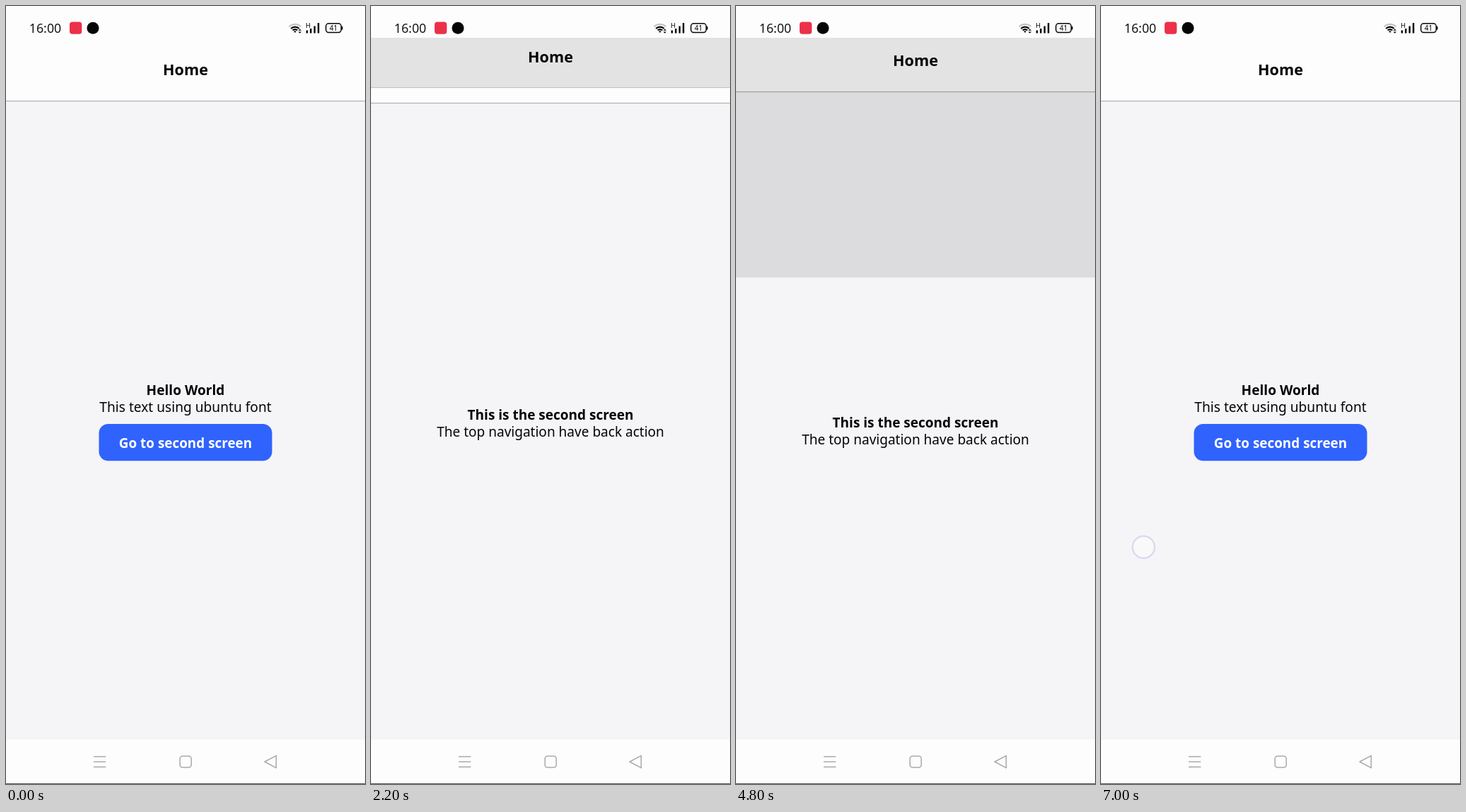
Animation, 508 px wide and 1102 px high, one loop 7040 ms. Source, as an HTML page with a canvas:

```html
<!DOCTYPE html>
<html lang="en">
<head>
<meta charset="utf-8">
<title>Screen navigation</title>
<style>
  html, body { margin: 0; width: 100%; height: 100%; overflow: hidden; background: #fefdfe; }
  canvas { display: block; width: 508px; height: 1102px; }
</style>
</head>
<body>
<canvas id="stage"></canvas>
<script>
const W = 508, H = 1102, LOOP = 7040;
const TOP = 45, BOTTOM = 1039, VIEW = BOTTOM - TOP;
const WHITE = '#fefdfe', PAPER = '#f5f4f7', INK = '#050505', GREY = '#a9a8aa';
const FONT = '"Noto Sans", "Open Sans", sans-serif';

const canvas = document.getElementById('stage');
const dpr = window.devicePixelRatio || 1;
canvas.width = W * dpr;
canvas.height = H * dpr;
const ctx = canvas.getContext('2d');

const clamp = v => Math.max(0, Math.min(1, v));

// Solves a CSS-style cubic bezier by bisection.
function bezier(x1, y1, x2, y2) {
  const at = (a, b, t) => 3 * (1 - t) * (1 - t) * t * a + 3 * (1 - t) * t * t * b + t * t * t;
  return x => {
    if (x <= 0 || x >= 1) return clamp(x);
    let lo = 0, hi = 1;
    for (let i = 0; i < 30; i++) {
      const mid = (lo + hi) / 2;
      if (at(x1, x2, mid) < x) lo = mid; else hi = mid;
    }
    return at(y1, y2, lo);
  };
}
const reveal = bezier(0.20833, 0.82, 0.25, 1);
const inOutQuad = u => u < 0.5 ? 2 * u * u : 1 - 2 * (1 - u) * (1 - u);

const REVEAL_MS = 425, OPEN = 2003, CLOSE = 4763;
const FADE = 240;
const TAPS = [
  { at: 1720, hold: 40, x: 297, y: 620.5 },
  { at: 3560, hold: 80, x: 41.5, y: 111.5 },
  { at: 4440, hold: 40, x: 38, y: 92 },
  { at: 6040, hold: 40, x: 61, y: 767 },
  { at: 6880, hold: 0, x: 60.3, y: 766.5 }
];

function rect(x, y, w, h, color) {
  ctx.fillStyle = color;
  ctx.fillRect(x, y, w, h);
}

function roundRect(x, y, w, h, r) {
  ctx.beginPath();
  ctx.roundRect(x, y, w, h, r);
}

function line(color, width, ...points) {
  ctx.beginPath();
  points.forEach(([x, y]) => ctx.lineTo(x, y));
  ctx.strokeStyle = color;
  ctx.lineWidth = width;
  ctx.stroke();
}

function text(str, x, y, size, weight = 400, color = INK) {
  ctx.font = `${weight} ${size}px ${FONT}`;
  ctx.textAlign = 'center';
  ctx.fillStyle = color;
  ctx.fillText(str, x, y);
}

function page(title) {
  rect(0, 0, W, H, PAPER);
  rect(0, 0, W, 134, WHITE);
  rect(0, 134, W, 1.3, '#b4b3b6');
  text(title, W / 2, 98, 21.6, 700);
}

function home(t) {
  page('Home');
  text('Hello World', W / 2, 550.5, 19.1, 700);
  text('This text using ubuntu font', W / 2, 574.5, 19.15);

  const pressed = t >= 1720 && t < 2010;
  ctx.save();
  ctx.globalAlpha = pressed ? 0.2 + 0.8 * inOutQuad(clamp((t - 1760) / 250)) : 1;
  roundRect(131.5, 592, 245, 52.3, 13);
  ctx.fillStyle = '#3063fd';
  ctx.fill();
  text('Go to second screen', W / 2, 625.5, 18.9, 700, '#fff');
  ctx.restore();
}

function second() {
  page('Second Screen');
  line(INK, 3.2, [40, 80], [29.7, 90], [40, 100.3]);
  text('This is the second screen', W / 2, 583.5, 19, 700);
  text('The top navigation have back action', W / 2, 607.5, 19.05);
}

function openness(t) {
  return t < CLOSE
    ? reveal(clamp((t - OPEN) / REVEAL_MS))
    : 1 - reveal(clamp((t - CLOSE) / REVEAL_MS));
}

function clipTo(y, h) {
  ctx.beginPath();
  ctx.rect(0, y, W, h);
  ctx.clip();
}

function screens(t) {
  const p = openness(t);
  ctx.save();
  clipTo(TOP, VIEW);

  rect(0, 0, W, H, PAPER);
  ctx.save();
  ctx.translate(0, -0.02 * VIEW * p);
  home(t);
  ctx.restore();
  rect(0, TOP, W, VIEW, `rgba(0,0,0,${0.1 * clamp(p / 0.36)})`);

  if (p > 0) {
    const drop = VIEW * (1 - p);
    clipTo(TOP + drop, VIEW);
    ctx.translate(0, 0.041 * drop);
    second();
  }
  ctx.restore();
}

function wifi(x, y) {
  const fan = (r, width, color) => {
    ctx.beginPath();
    ctx.arc(x, y, r, -Math.PI * 0.75, -Math.PI * 0.25);
    ctx.strokeStyle = color;
    ctx.lineWidth = width;
    ctx.stroke();
  };
  fan(12, 2.2, '#c2c1c3');
  fan(8.2, 2.2, INK);
  fan(4.6, 2.2, INK);
  ctx.beginPath();
  ctx.moveTo(x, y);
  ctx.arc(x, y, 2.4, -Math.PI * 0.78, -Math.PI * 0.22);
  ctx.fillStyle = INK;
  ctx.fill();
  for (const s of [-1, 1]) {
    ctx.beginPath();
    ctx.moveTo(x + 4.6, y - 2.2 + s * 0.8);
    ctx.lineTo(x + 9, y - 2.2 + s * 0.8);
    ctx.lineTo(x + 6.8, y - 2.2 + s * 3.2);
    ctx.fill();
  }
}

function statusBar() {
  rect(0, 0, W, TOP, WHITE);
  text('16:00', 55.5, 38.3, 17.8, 400, '#151515');

  roundRect(90, 22.5, 17.3, 17.3, 4);
  ctx.fillStyle = '#ec3049';
  ctx.fill();
  ctx.beginPath();
  ctx.arc(123, 31.2, 8.5, 0, Math.PI * 2);
  ctx.fillStyle = '#050505';
  ctx.fill();

  wifi(409, 37.8);
  text('H', 427.5, 30.5, 9.5, 500);
  [4, 6.5, 10, 14.5].forEach((h, i) => rect(424.7 + i * 5.4, 38.5 - h, 2.4, h, INK));

  roundRect(452.7, 24.8, 21.6, 12.8, 4);
  ctx.strokeStyle = INK;
  ctx.lineWidth = 1.5;
  ctx.stroke();
  rect(475, 29, 1.5, 4.5, INK);
  text('41', 463.4, 34.8, 10, 500);
}

function navBar() {
  rect(0, BOTTOM, W, H - BOTTOM, WHITE);
  for (const y of [1063.3, 1070.5, 1077.8]) line(GREY, 1.5, [124, y], [141.3, y]);
  roundRect(246.2, 1062.5, 16, 16, 3.5);
  ctx.stroke();
  ctx.beginPath();
  ctx.moveTo(366, 1070.5);
  ctx.lineTo(382.3, 1061.8);
  ctx.lineTo(382.3, 1079.2);
  ctx.closePath();
  ctx.lineJoin = 'round';
  ctx.stroke();
  ctx.lineJoin = 'miter';
  rect(0, 1101, W, 1, '#59585a');
}

function taps(t) {
  for (const { at, hold, x, y } of TAPS) {
    const age = t - at;
    if (age < 0 || age >= hold + FADE) continue;
    ctx.save();
    ctx.globalAlpha = 1 - clamp((age - hold) / FADE);
    ctx.beginPath();
    ctx.arc(x, y, 15.6, 0, Math.PI * 2);
    ctx.fillStyle = 'rgba(255,255,255,0.78)';
    ctx.fill();
    ctx.strokeStyle = '#b5bbe5';
    ctx.lineWidth = 2.2;
    ctx.stroke();
    ctx.restore();
  }
}

const start = performance.now();
function frame() {
  const t = (performance.now() - start) % LOOP;
  ctx.setTransform(dpr, 0, 0, dpr, 0, 0);
  screens(t);
  statusBar();
  navBar();
  taps(t);
  requestAnimationFrame(frame);
}
frame();
</script>
</body>
</html>
```
